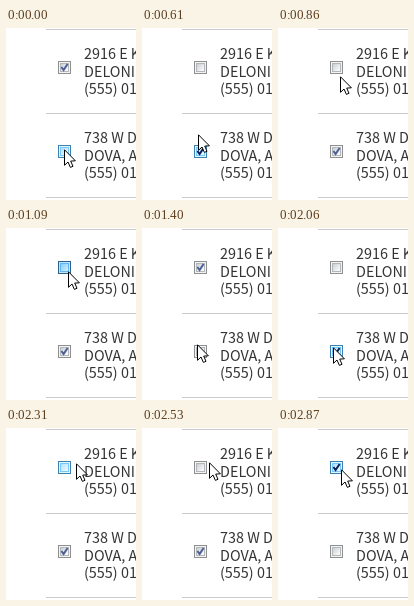
An HTML page with a canvas for the animation above (2.97 s loop, 130 by 172 pixels).

```html
<!DOCTYPE html>
<html lang="en">
<head>
<meta charset="utf-8">
<title>Checkbox list</title>
<style>
html, body { margin: 0; width: 100%; height: 100%; overflow: hidden; background: #fff; }
canvas { display: block; width: 130px; height: 172px; }
</style>
</head>
<body>
<canvas id="stage" width="130" height="172"></canvas>
<script>
const ctx = document.getElementById('stage').getContext('2d');
const LOOP = 2970;
const FONT = '14.4px "Noto Sans CJK JP", "Noto Sans CJK SC", "Noto Sans CJK", "Open Sans", sans-serif';

const rows = [
  { top: 1, lines: ['2916 E K', 'DELONI', '(555) 01'] },
  { top: 85, lines: ['738 W D', 'DOVA, A', '(555) 01'] }
];

// Colours: border, ring, inner frame, gradient start, gradient end, tick
const looks = {
  idle: ['#8e8f8f', '#f4f4f4', '#b3b7bb', '#cbced2', '#f8f8f8', '#4a5f97'],
  hot: ['#3c7fb1', '#def9fa', '#79c6f9', '#b1dffd', '#e9f7fe', '#0a2058'],
  down: ['#2c628b', '#c2e4f6', '#5eb6f7', '#86cdf6', '#cbeafb', '#0a2058']
};

// Time, pointer x, pointer y, upper look, lower look, checked row
const steps = [
  [0, 58, 121, 'idle', 'hot', 0],
  [430, 58, 121, 'idle', 'down', 0],
  [520, 58, 121, 'idle', 'hot', 1],
  [610, 56, 106, 'idle', 'hot', 1],
  [710, 58, 84, 'idle', 'idle', 1],
  [780, 60, 62, 'idle', 'idle', 1],
  [860, 62, 48, 'idle', 'idle', 1],
  [940, 62, 43, 'hot', 'idle', 1],
  [1090, 62, 43, 'down', 'idle', 1],
  [1240, 62, 43, 'hot', 'idle', 0],
  [1320, 59, 78, 'idle', 'idle', 0],
  [1400, 55, 116, 'idle', 'idle', 0],
  [1640, 62, 123, 'idle', 'hot', 0],
  [1790, 62, 123, 'idle', 'down', 0],
  [1890, 61, 125, 'idle', 'hot', 1],
  [1970, 58, 123, 'idle', 'hot', 1],
  [2060, 55, 119, 'idle', 'hot', 1],
  [2130, 57, 86, 'idle', 'idle', 1],
  [2220, 63, 44, 'hot', 'idle', 1],
  [2310, 70, 35, 'hot', 'idle', 1],
  [2390, 69, 32, 'idle', 'idle', 1],
  [2470, 67, 34, 'idle', 'idle', 1],
  [2550, 64, 38, 'hot', 'idle', 1],
  [2620, 63, 41, 'hot', 'idle', 1],
  [2800, 63, 41, 'down', 'idle', 1],
  [2870, 63, 41, 'hot', 'idle', 0]
];

function trace(points) {
  ctx.beginPath();
  points.forEach(([x, y]) => ctx.lineTo(x, y));
}

function drawRow({ top, lines }) {
  ctx.fillStyle = '#333';
  ctx.font = FONT;
  lines.forEach((text, i) => ctx.fillText(text, 78, top + 30 + Math.round(i * 17.5)));
}

function drawBox(x, y, look, checked) {
  const [border, ring, frame, from, to, tick] = looks[look];
  const shade = ctx.createLinearGradient(3, 3, 9, 9);
  shade.addColorStop(0, from);
  shade.addColorStop(1, to);
  ctx.save();
  ctx.translate(x, y);
  [border, ring, frame, shade].forEach((fill, i) => {
    ctx.fillStyle = fill;
    ctx.fillRect(i, i, 13 - 2 * i, 13 - 2 * i);
  });
  if (checked) {
    trace([[3.4, 6], [5.6, 9.1], [9.6, 3]]);
    ctx.strokeStyle = tick;
    ctx.lineWidth = 2;
    ctx.stroke();
  }
  ctx.restore();
}

function drawPointer(x, y) {
  ctx.save();
  ctx.translate(x, y);
  trace([[0.5, 0.8], [0.5, 16.3], [4, 13], [6.4, 18.4], [9, 17.3], [6.7, 12.1], [11.4, 11.8]]);
  ctx.closePath();
  ctx.fillStyle = '#fff';
  ctx.fill();
  ctx.strokeStyle = '#000';
  ctx.lineWidth = 1;
  ctx.lineJoin = 'round';
  ctx.stroke();
  ctx.restore();
}

function draw(time) {
  const [, x, y, upper, lower, picked] = steps.findLast(step => step[0] <= time);
  ctx.fillStyle = '#fff';
  ctx.fillRect(0, 0, 130, 172);
  ctx.fillStyle = '#ccc';
  [1, 85, 169].forEach(top => ctx.fillRect(40, top, 90, 1));
  rows.forEach(drawRow);
  drawBox(52, 33, upper, picked === 0);
  drawBox(52, 117, lower, picked === 1);
  drawPointer(x, y);
}

const start = performance.now();
function tick() {
  draw((performance.now() - start) % LOOP);
  requestAnimationFrame(tick);
}
tick();
</script>
</body>
</html>
```
